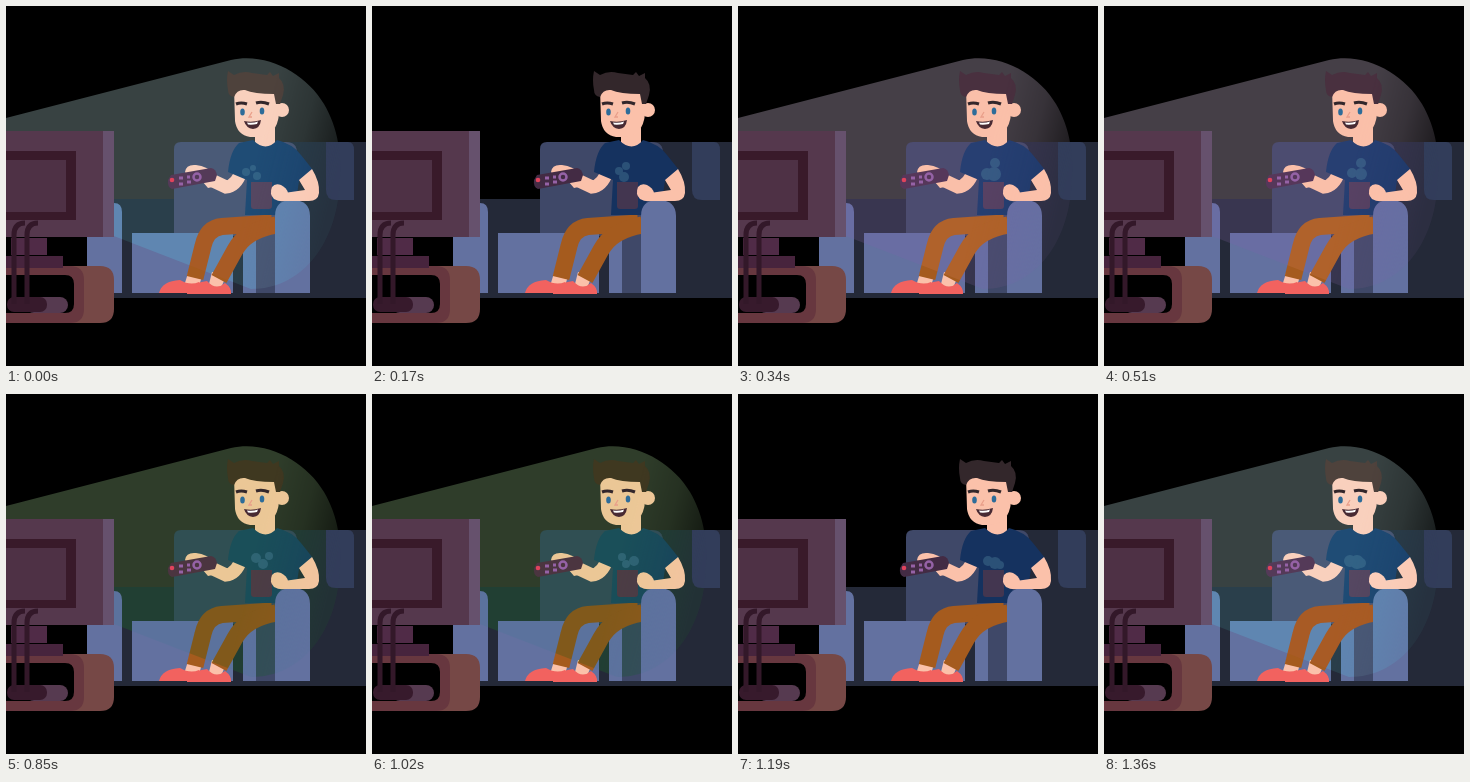
An HTML page that plays this animation: 360 px wide and 360 px high, repeating every 1.53 s.

```html
<!DOCTYPE html>
<html lang="en">
<head>
<meta charset="utf-8">
<title>Watching television</title>
<style>
html, body { margin: 0; width: 100%; height: 100%; overflow: hidden; background: #000; }
svg { display: block; width: 100vw; height: 100vh; }
.dark {
  --air: #000; --wall: #242938; --back: #3f4868; --seat: #6371a0; --shirt: #15325f;
  --skin: #fbc1aa; --hair: #33272b; --pants: #a55b1e; --mug: #433650; --remote: #432b44;
}
.blue {
  --air: #384242; --wall: #2a3f4b; --back: #4a5a77; --seat: #5f86b1; --shirt: #1f4c75;
  --skin: #f9d0bd; --hair: #4e423c; --pants: #a85b25; --mug: #564862; --remote: #543a58;
}
.purple {
  --air: #453f47; --wall: #393650; --back: #4c4c70; --seat: #696da3; --shirt: #273f72;
  --skin: #fabfa9; --hair: #49303f; --pants: #b0622b; --mug: #584264; --remote: #56375a;
}
.green {
  --air: #2f3d2a; --wall: #213f33; --back: #304f53; --seat: #5b729d; --shirt: #1a4f59;
  --skin: #ebc796; --hair: #3f3820; --pants: #81591b; --mug: #4c3d44; --remote: #4b3540;
}
.air { fill: var(--air); }
.wall { fill: var(--wall); }
.back { fill: var(--back); }
.seat { fill: var(--seat); }
.shirt { fill: var(--shirt); }
.skin { fill: var(--skin); }
.hair { fill: var(--hair); }
.mug { fill: var(--mug); }
.remote { fill: var(--remote); }
.limb { fill: none; stroke: var(--skin); stroke-width: 13; }
.leg { fill: none; stroke: var(--pants); stroke-width: 17; }
</style>
</head>
<body>
<svg viewBox="0 0 360 360">
  <defs>
    <linearGradient id="fade" gradientUnits="userSpaceOnUse" x1="255" y1="130" x2="335" y2="150">
      <stop offset="0" stop-color="#fff"/>
      <stop offset=".5" stop-color="#ccc"/>
      <stop offset="1" stop-color="#666"/>
    </linearGradient>
    <mask id="beam" maskUnits="userSpaceOnUse" x="0" y="0" width="360" height="360">
      <path fill="url(#fade)" d="M0 112L225 54C262 46 300 68 318 98C332 122 337 150 333 185C328 240 295 283 245 283L100 227H0Z"/>
    </mask>

    <g id="scene">
      <path class="air" d="M0 0H360V292H0Z"/>

      <!-- sofa -->
      <path class="wall" d="M81 193H168V150H280V136H360V292H81Z"/>
      <path class="back" d="M168 230V143Q168 136 175 136H280Q291 136 291 147V230Z"/>
      <path fill="#323d5a" d="M320 136H342Q348 136 348 144V194H330Q320 194 320 184Z"/>
      <path class="seat" d="M81 197H108Q116 197 116 206V287H81ZM126 227H227V287H126ZM237 227H250V287H237Z"/>
      <path class="back" d="M250 205H272V287H250Z"/>

      <!-- legs -->
      <path class="skin" d="M183 264L197 267L193 280H178ZM206 266L220 270L215 282H202Z"/>
      <path class="leg" d="M266 217L216 220.500Q201 222 197 240L189 272"/>
      <path class="leg" d="M270 219Q240 224 229 244L213 273"/>
      <path fill="#f2625f" d="M153 287Q156 275 174 274Q184 280 193 276L196 287ZM181 287Q184 277 201 275Q210 285 219 277Q226 282 225 288H181Z"/>

      <!-- head -->
      <path class="skin" d="M249 122H269V144H249Z"/>
      <path class="skin" d="M228 82H273V108Q271 131 250 131H244Q231 129 229 115Z"/>
      <circle class="skin" cx="276" cy="104" r="7"/>
      <path class="hair" d="M222 84Q220 74 222 65L228 69Q237 64 246 67L261 69L264 66L267 70L273 67V72Q280 78 277 89L274 98H270L268 88Q248 88 239 84Q231 83 228 91Q222 90 222 84Z"/>
      <path d="M230 98Q235 96 241 98M250 97Q256 95 263 98" fill="none" stroke="#33272b" stroke-width="3"/>
      <g fill="#2d6c99">
        <ellipse cx="236.500" cy="106" rx="2.300" ry="3.500"/>
        <ellipse cx="256" cy="105" rx="2.300" ry="3.500"/>
      </g>
      <path d="M246 106L243 111H246" fill="none" stroke="#e99f8a" stroke-width="1.300"/>
      <path fill="#482a33" d="M238 115Q246 117 255 114Q254 122.500 247 123Q240 122 238 115Z"/>
      <path fill="#fff" d="M241 116.500Q247 117.500 252 115.500L251 118Q246 119 242 118.500Z"/>

      <!-- body -->
      <path class="limb" d="M235 166Q230 180 220 181L203 173"/>
      <path class="shirt" d="M247 134Q260 147 271 134Q287 138 295 149L307 164L293 175L288 209H239L241 174L222 166Q224 145 233 137Z"/>
      <path class="seat" d="M269 287V210Q269 194 286 194Q304 194 304 210V287Z"/>
      <path class="skin" d="M293 174L306 163Q314 176 313 187Q312 195 303 195H278V187L299 184Z"/>

      <!-- remote and hand -->
      <path class="skin" d="M179 166Q180 158 190 159Q201 160 210 169L211 180L202 182L190 168L182 171Z"/>
      <path class="remote" d="M165 169L205 162Q210 163 211 169L209 175L166 183Q161 181 162 174Z"/>
      <circle cx="166" cy="174" r="2.300" fill="#e0435c"/>
      <path d="M173 172H177M173 178H177M181 171H184M181 176H185" stroke="#9562a6" stroke-width="3"/>
      <circle cx="191" cy="171" r="3.500" fill="none" stroke="#9562a6" stroke-width="2.500"/>

      <!-- mug and hand -->
      <path class="mug" d="M245 176H266V200Q266 203 263 203H248Q245 203 245 200Z"/>
      <path class="skin" d="M266 181Q269 177 275 179Q281 182 282 187V194Q275 197 268 193Q263 188 266 181Z"/>
    </g>
  </defs>

  <use href="#scene" class="dark"/>
  <use href="#scene" id="lit" mask="url(#beam)"/>
  <g id="steam" fill="#5a91a8" opacity=".33">
    <circle/><circle/><circle/>
  </g>

  <!-- cabinet -->
  <path fill="#764846" d="M0 260H94Q108 260 108 274V303Q108 317 94 317H0Z"/>
  <path fill="#67373f" d="M0 260H64Q78 260 78 274V303Q78 317 64 317H0Z"/>
  <path d="M0 269H59Q68 269 68 278V298Q68 307 59 307H0Z"/>
  <path fill="#47243d" d="M0 250H57V262H0Z"/>

  <!-- television -->
  <path fill="#55384d" d="M0 125H108V231H0Z"/>
  <path fill="#66516d" d="M97 125H108V231H97Z"/>
  <path fill="#391a2a" d="M0 145H70V214H0Z"/>
  <path fill="#4e3145" d="M0 154H60V206H0Z"/>
  <path fill="#502b47" d="M5 232H41V249H5Z"/>
  <rect x="20" y="291" width="42" height="16" rx="8" fill="#563a50"/>
  <rect x="1" y="291" width="40" height="15" rx="7" fill="#371a2c"/>
  <path d="M8 298V229Q8 217 19 217M21 298V229Q21 217 32 217" fill="none" stroke="#331829" stroke-width="5"/>
</svg>
<script>
const STEP = 170;
const lights = ["blue", "dark", "purple", "purple", "dark", "green", "green", "dark", "blue"];

// Three puffs per step: x, y, radius
const puffs = [
  [240, 166, 4, 247, 162, 3, 251, 170, 4],
  [247, 165, 4, 254, 160, 4, 252, 171, 5],
  [257, 157, 5, 249, 168, 6, 256, 168, 7],
  [257, 157, 5, 248, 167, 5, 257, 168, 6],
  [249, 166, 6, 257, 165, 5, 263, 164, 4],
  [250, 164, 5, 257, 170, 5, 263, 162, 4],
  [250, 163, 4, 254, 170, 4, 262, 167, 5],
  [250, 167, 5, 257, 169, 6, 262, 171, 4],
  [246, 167, 6, 253, 168, 7, 257, 169, 5]
];

const lit = document.getElementById("lit");
const circles = document.querySelectorAll("#steam circle");
let shown = -1;

function show(step) {
  lit.setAttribute("class", lights[step]);
  lit.setAttribute("visibility", lights[step] === "dark" ? "hidden" : "visible");
  circles.forEach((circle, i) => {
    ["cx", "cy", "r"].forEach((name, j) => circle.setAttribute(name, puffs[step][i * 3 + j]));
  });
}

const start = performance.now();
function tick() {
  const step = Math.floor((performance.now() - start) / STEP) % lights.length;
  if (step !== shown) show(shown = step);
  requestAnimationFrame(tick);
}
tick();
</script>
</body>
</html>
```
